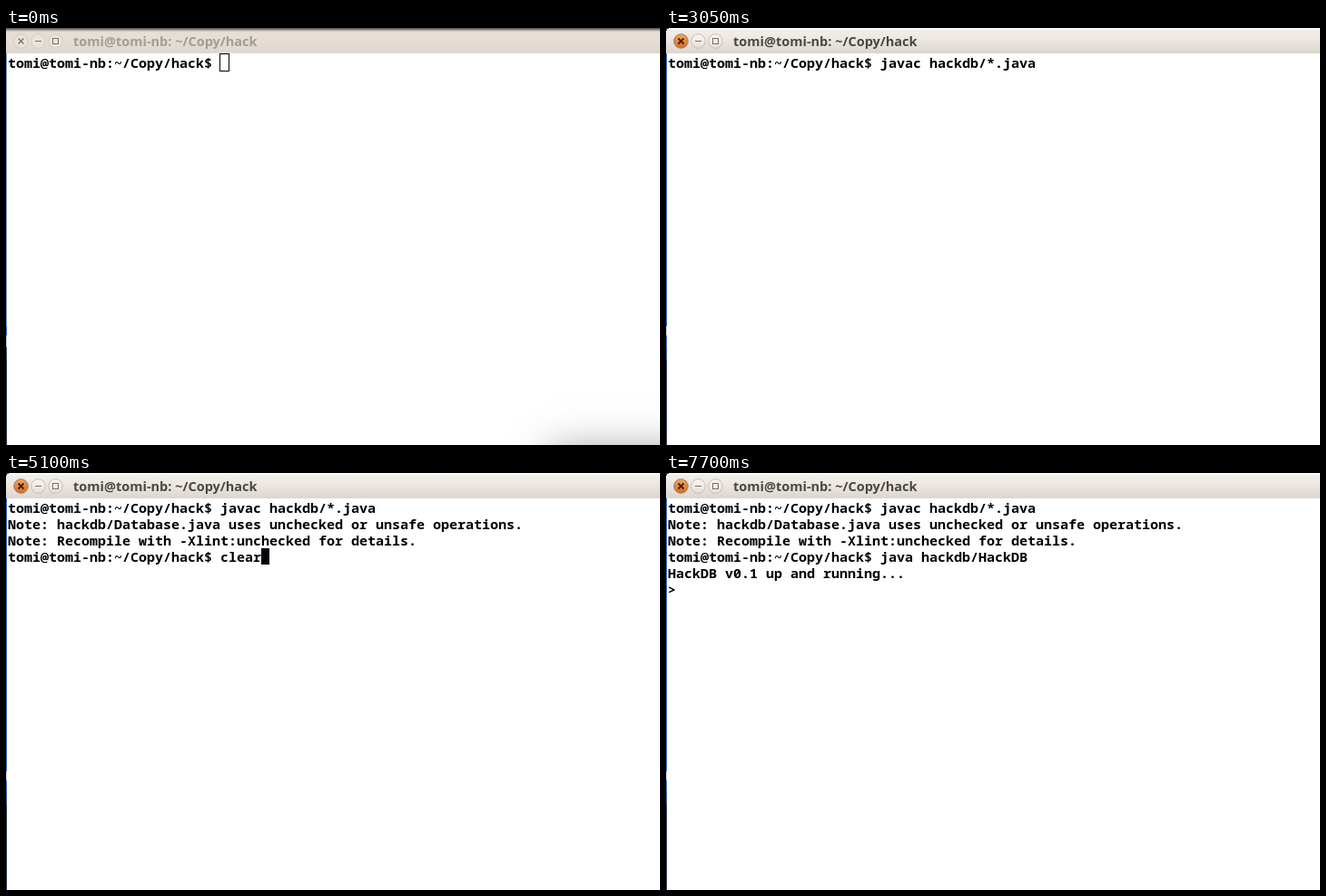
Animation of 720 by 460 pixels, one loop 8 s. Source, as an HTML page with a canvas:

```html
<!DOCTYPE html>
<html lang="en">
<head>
<meta charset="utf-8">
<title>Terminal</title>
<style>
  html, body { margin: 0; width: 100%; height: 100%; overflow: hidden; background: #fff; }
  canvas { display: block; }
</style>
</head>
<body>
<canvas id="stage" width="720" height="460"></canvas>
<script>
const g = document.getElementById('stage').getContext('2d');
const LOOP = 8000, CELL_W = 9, CELL_H = 18, LEFT = 2, TOP = 29;
const HOST = 'tomi@tomi-nb:', DIR = '~/Copy/hack';
const PROMPT = HOST + DIR + '$ ';
const COMPILE = 'javac hackdb/*.java', CLEAR = 'clear', RUN = 'java hackdb/HackDB';
const NOTES = [
  PROMPT + COMPILE,
  'Note: hackdb/Database.java uses unchecked or unsafe operations.',
  'Note: Recompile with -Xlint:unchecked for details.'
];
const RUNNING = [...NOTES, PROMPT + RUN];
const second = cmd => [...NOTES, PROMPT + cmd];

// [start time, lines, cursor visible]; the cursor sits after the last line
const STATES = [
  [0, [PROMPT], true],
  [1200, [PROMPT], false],
  [1240, [PROMPT + CLEAR], true],
  [1720, [PROMPT + COMPILE], true],
  [2290, [PROMPT + COMPILE], false],
  [2480, [PROMPT + COMPILE, ''], true],
  [3050, [PROMPT + COMPILE, ''], false],
  [3420, second(''), false],
  [3640, second(''), true],
  [3870, second(COMPILE), true],
  [4190, second(CLEAR), true],
  [4580, second(COMPILE), true],
  [5100, second(CLEAR), true],
  [5620, second(COMPILE), true],
  [6070, second(CLEAR), true],
  [6390, second(RUN), true],
  [6960, second(RUN), false],
  [7130, [...RUNNING, ''], true],
  [7210, [...RUNNING, 'HackDB v0.1 up and running...', '> '], true],
  [7700, [...RUNNING, 'HackDB v0.1 up and running...', '> '], false]
];

function rect(color, x, y, w, h) {
  g.fillStyle = color;
  g.fillRect(x, y, w, h);
}

function vertical(y0, y1, ...colors) {
  const grad = g.createLinearGradient(0, y0, 0, y1);
  colors.forEach((c, i) => grad.addColorStop(i / (colors.length - 1), c));
  return grad;
}

function line(color, width, ...segments) {
  g.strokeStyle = color;
  g.lineWidth = width;
  g.beginPath();
  for (const [x0, y0, x1, y1] of segments) {
    g.moveTo(x0, y0);
    g.lineTo(x1, y1);
  }
  g.stroke();
}

function disc(x, fill, rim) {
  g.beginPath();
  g.arc(x, 14.5, 7.8, 0, 7);
  g.fillStyle = fill;
  g.fill();
  g.strokeStyle = rim;
  g.lineWidth = 1;
  g.stroke();
}

function titleBar(active) {
  rect(active ? vertical(0, 28, '#f3f0ec', '#ebe6e0', '#ddd5cc')
              : vertical(0, 28, '#e6dfd8', '#e5ddd6', '#dfd7cf'), 0, 0, 720, 28);
  if (active) {
    rect('#fbf9f7', 0, 0, 720, 2);
    rect('#22304e', 0, 0, 3, 1);
    rect('#22304e', 0, 1, 1, 2);
  } else {
    rect(vertical(0, 5, '#454340', 'rgba(110,105,100,.5)', 'rgba(225,218,210,0)'), 0, 0, 720, 5);
  }
  const face = active ? vertical(6, 23, '#faf8f6', '#e4ddd5') : '#e9e3dc';
  const rim = active ? '#c6beb4' : '#d3cbc2';
  const mark = '#77716a';
  disc(16.5, active ? vertical(6, 23, '#f0a862', '#cf6a24') : face, active ? '#a87a58' : rim);
  disc(35.5, face, rim);
  disc(54.5, face, rim);
  line(active ? '#4a1f08' : mark, active ? 1.8 : 1.3,
    [13.5, 11.5, 19.5, 17.5], [19.5, 11.5, 13.5, 17.5]);
  line(mark, 1, [32, 14.5, 39, 14.5]);
  g.strokeRect(51.5, 11.5, 6, 6);
  g.font = 'bold 14.5px "Open Sans", sans-serif';
  g.fillStyle = active ? '#4a4844' : '#a39d95';
  g.fillText(HOST + ' ' + DIR, 74, 20);
}

// One pixel of desktop showing beside the window
function desktopEdge(active) {
  rect(active ? '#1f5cba' : '#6f9bc9', 0, 28, 1, 302);
  rect(active ? '#c3c8d0' : '#1c5fc4', 0, 329, 1, 10);
  rect(active ? '#2c66bd' : '#b4c4d8', 0, 339, 1, 13);
  rect(active ? '#2a5496' : '#33435f', 0, 352, 1, 14);
  rect('#1d2a45', 0, 366, 1, 94);
}

function cornerShadow() {
  g.save();
  g.shadowColor = 'rgba(0,0,0,.45)';
  g.shadowBlur = 42;
  g.shadowOffsetY = -300;
  rect('#000', 600, 768, 300, 200);
  g.restore();
}

function pointer(t) {
  if (t < 310 || t >= 1280) return;
  const left = 1 - Math.min(1, Math.floor((t - 310) / 43.4) / 3);
  const x = 407.5 + Math.round(100 * left ** 2), y = 350.5 + Math.round(95 * left ** 2);
  const beam = [[x - 2, y, x + 2, y], [x, y, x, y + 13], [x - 2, y + 13, x + 2, y + 13]];
  g.lineCap = 'square';
  line('#000', 3, ...beam);
  line('#fff', 1, ...beam);
  g.lineCap = 'butt';
}

function terminal(t, active) {
  const [, lines, cursor] = STATES.findLast(s => t >= s[0]);
  g.font = '600 15px "Noto Sans Mono", monospace';
  g.fillStyle = '#000';
  lines.forEach((s, i) => g.fillText(s, LEFT, TOP + 15 + i * CELL_H));
  if (!cursor) return;
  const row = lines.length - 1;
  const x = LEFT + lines[row].length * CELL_W, y = TOP + row * CELL_H;
  if (active) {
    rect('#08000f', x, y, CELL_W, CELL_H);
  } else {
    g.strokeStyle = '#000';
    g.lineWidth = 1;
    g.strokeRect(x - .5, y - .5, CELL_W + 1, CELL_H + 1);
  }
}

function draw(now) {
  const t = now % LOOP, active = t >= 630;
  rect('#fff', 0, 0, 720, 460);
  if (!active) cornerShadow();
  titleBar(active);
  desktopEdge(active);
  terminal(t, active);
  pointer(t);
}

const start = performance.now();
function frame() {
  draw(performance.now() - start);
  requestAnimationFrame(frame);
}
frame();
</script>
</body>
</html>
```
